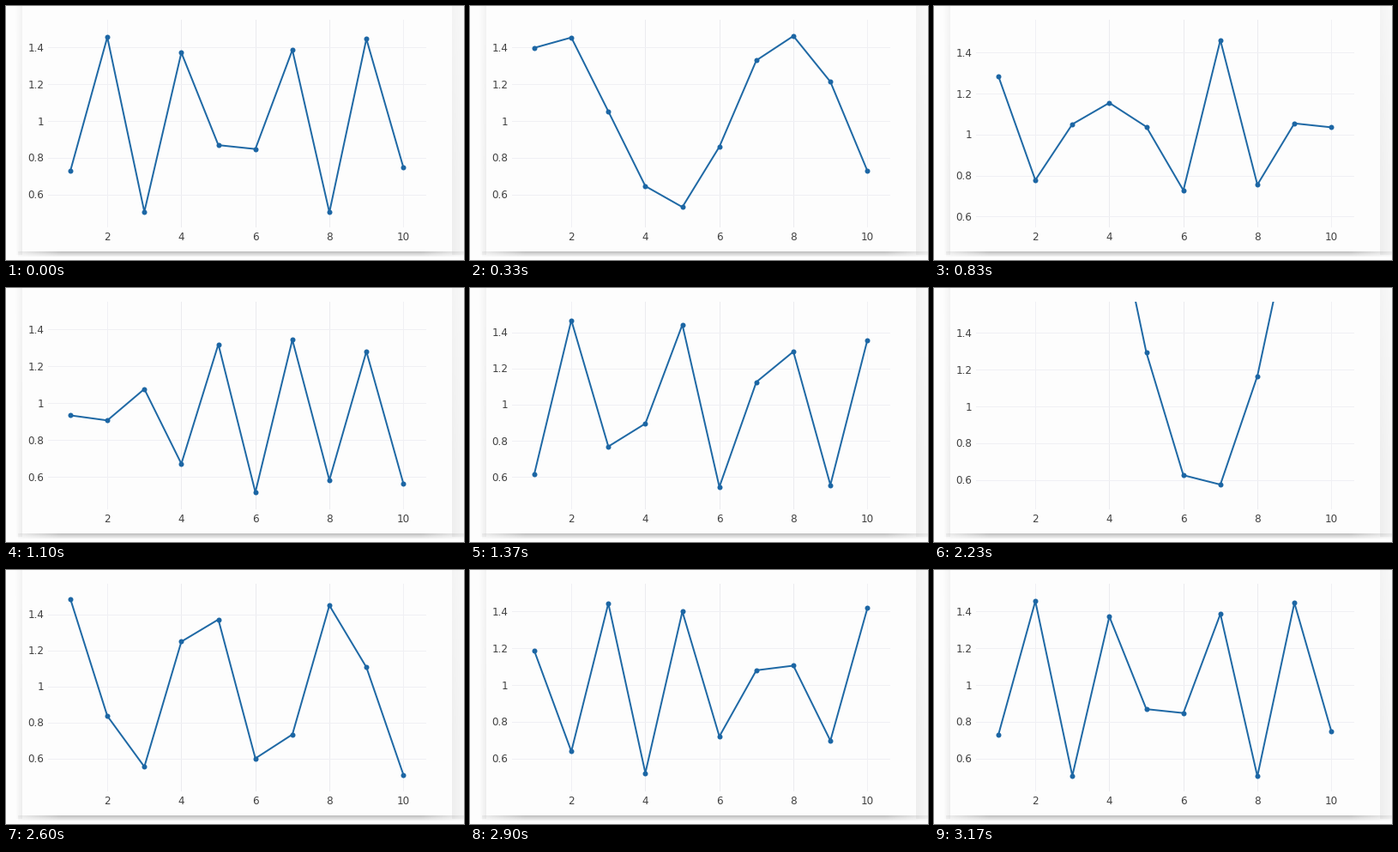
A matplotlib script for the animation above (3.21 s loop, 534x296 px).

```python
import numpy as np
import matplotlib.pyplot as plt
from matplotlib.animation import FuncAnimation
from matplotlib.patches import Rectangle

W, H, DPI = 534, 296, 100
PX = 72 / DPI                      # points per pixel
LOOP, STEP = 3210, 10

LEFT, RIGHT, TOP, BOTTOM = 48.5, 489, 15.5, 257
Y_MAX, Y_MIN = 31.7, 240.2         # rows of the largest and smallest value
X1, DX = 75, 43.15

PAPER = np.array([253, 253, 253]) / 255
GLOW = np.array([234, 234, 234]) / 255
SHADE = np.array([188, 188, 188]) / 255
LINE, DOT, INK = "#1f69a5", "#1c66a4", "#404040"
GRID, GRID_SOFT = "#ebebef", "#f0f0f4"

TWEEN = 300
STARTS = [90, 389, 689, 992, 1294, 1600, 1914, 2228, 2542, 2850]
AXES = [9] + list(range(1, 10))    # wave that sets the y axis in each move

N = np.arange(1, 11)
XS = X1 + DX * (N - 1)


def wave(k):
    return 1 + 0.5 * np.sin(k * N)


def ease(u):
    u = min(max(u, 0), 1)
    return 4 * u**3 if u < 0.5 else 1 - 4 * (1 - u)**3


def clock(ms):
    """Time on a 30 fps grid, with the stall after the first move."""
    t = int((ms + 5) * 3 / 100) * 100 / 3
    return 330 if 330 <= t < 466 else t


def scale(k):
    """Map from value to row, and the value range, on the axis of wave k."""
    lo, hi = wave(k).min(), wave(k).max()
    return lambda v: Y_MIN - (v - lo) * (Y_MIN - Y_MAX) / (hi - lo), hi - lo


def state(ms):
    """Rows of the points and the axis in use.

    Points glide on screen from where the previous axis left them.
    """
    t = clock(ms)
    step = max(sum(t >= s for s in STARTS) - 1, 0)
    p = ease((t - STARTS[step]) / TWEEN)
    before = scale(AXES[step - 1])[0](wave(step or 10))
    after = scale(AXES[step])[0](wave(step + 1))
    return (1 - p) * before + p * after, AXES[step]


def backdrop():
    y, x = np.mgrid[0:H, 0:W] + 0.5
    img = np.ones((H, W, 3)) * PAPER

    def blend(colour, alpha):
        a = np.clip(alpha, 0, 1)[..., None]
        img[:] = img * (1 - a) + colour * a

    fall = (0.65 + 0.35 * np.clip(y / 200, 0, 1)) * (y < 290)
    blend(GLOW, np.where(x < 19, (x - 11) / 8, 0) * 0.8 * fall)
    blend(GLOW, np.where(x > 519.5, 1 - (x - 519.5) / 24, 0) * 0.8 * fall)
    ends = np.clip((x - 14) / 50, 0, 1) * np.clip((W - x) / 50, 0, 1)
    band = np.where((y > 286) & (y < 292), 1 - (y - 286) / 7, 0)
    blend(SHADE, band * (0.25 + 0.75 * ends) * (x > 14))
    return img


fig = plt.figure(figsize=(W / DPI, H / DPI), dpi=DPI)
ax = fig.add_axes([0, 0, 1, 1])
ax.imshow(backdrop(), extent=(0, W, H, 0), aspect="auto",
          interpolation="nearest", zorder=0)
ax.set(xlim=(0, W), ylim=(H, 0))
ax.axis("off")

font = dict(family="DejaVu Sans", size=12 * PX, color=INK, va="baseline")

for n in range(2, 11, 2):
    x = X1 + DX * (n - 1)
    ax.plot([x, x], [TOP, BOTTOM], lw=PX, zorder=1,
            color=GRID_SOFT if n in (2, 10) else GRID)
    ax.text(x, 273, str(n), ha="center", **font)

rows = [(ax.plot([LEFT, RIGHT], [0, 0], lw=PX, color=GRID_SOFT, zorder=1)[0],
         ax.text(44.5, 0, "", ha="right", **font)) for _ in range(7)]

curve, = ax.plot([], [], "-o", color=LINE, lw=2 * PX, ms=6 * PX, mfc=DOT,
                 mec="none", zorder=3, solid_joinstyle="round")
curve.set_snap(False)
curve.set_clip_path(Rectangle((LEFT, TOP), RIGHT - LEFT, BOTTOM - TOP,
                              transform=ax.transData))


def draw(i):
    ys, axis = state(i * STEP)
    to_y, span = scale(axis)
    gap = 0.2 if span > 0.5 else 0.1
    ticks = [v for v in np.arange(0.4, 1.75, gap)
             if TOP <= to_y(v) <= BOTTOM]
    for j, (rule, label) in enumerate(rows):
        shown = j < len(ticks)
        rule.set_visible(shown)
        label.set_visible(shown)
        if shown:
            y = to_y(ticks[j])
            rule.set_ydata([y, y])
            label.set_y(y + 4.6)
            label.set_text(f"{ticks[j]:.3g}")
    curve.set_data(XS, ys)
    return [curve]


anim = FuncAnimation(fig, draw, frames=LOOP // STEP, interval=STEP,
                     repeat=True, repeat_delay=0)
plt.show()
```
